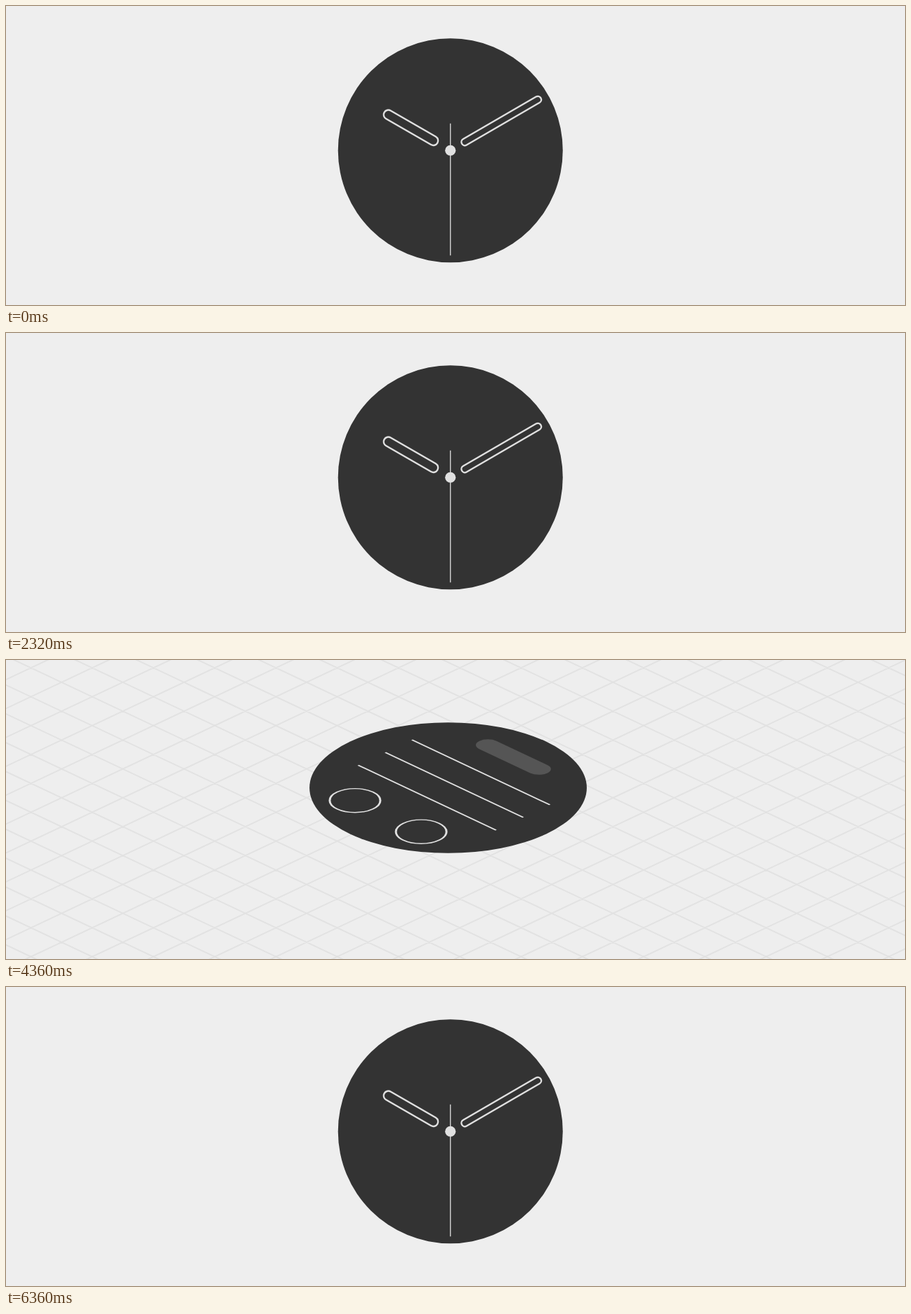
Recreate the animation shown at these times as an HTML page. Size 1280 by 427 pixels, loop 7 s.

```html
<!DOCTYPE html>
<html lang="en">
<head>
<meta charset="utf-8">
<title>Watch faces</title>
<style>
  html, body { margin: 0; width: 100%; height: 100%; overflow: hidden; background: #eee; }
  svg { display: block; width: 100vw; height: 100vh; }
  .disc { fill: #333; }
  .line { fill: none; stroke: #e0e0e0; stroke-width: 2.4; }
  .thin { stroke-width: 1.3; }
  .dot { fill: #e0e0e0; }
  .pill { fill: #555; }
  #grid { fill: none; stroke: #e2e2e2; stroke-width: 2.6; }
</style>
</head>
<body>
<svg viewBox="0 0 1280 427">
  <path id="grid"/>
  <g id="clock">
    <circle class="disc" r="160"/>
    <rect class="line" x="21.3" y="-6.7" width="87.4" height="13.4" rx="6.7" transform="rotate(-150)"/>
    <rect class="line" x="18.9" y="-4.9" width="130" height="9.8" rx="4.9" transform="rotate(-30.2)"/>
    <path class="line thin" d="M0-38.5V150"/>
    <circle class="dot" r="7.6"/>
  </g>
  <g id="list">
    <circle class="disc" r="160"/>
    <rect class="pill" x="-55.5" y="-120.5" width="111" height="28" rx="14"/>
    <path class="line" d="M-112.5-53.5h225M-112.5-10h225M-112.5 34.3h225"/>
    <circle class="line" cx="-54" cy="98" r="29.2"/>
    <circle class="line" cx="54" cy="98" r="29.2"/>
  </g>
</svg>
<script>
const LOOP = 7000;
const CENTER = [632.75, 206.25];
const ARM = [473, -50];          // face centre relative to the pivot
const SHIFT = [13.5, -246.7];    // pivot travel when fully tilted
const AXIS = [0.7782, -0.3223, 0.5387];
const TILT = 75.1 * Math.PI / 180;
const LIFT = 30;

const byId = id => document.getElementById(id);
const grid = byId('grid'), clock = byId('clock'), list = byId('list');

function bezier(x1, y1, x2, y2) {
  const at = (a, b, u) => 3 * a * u * (1 - u) ** 2 + 3 * b * u * u * (1 - u) + u ** 3;
  return x => {
    if (x <= 0) return 0;
    if (x >= 1) return 1;
    let lo = 0, hi = 1;
    for (let i = 0; i < 24; i++) {
      const mid = (lo + hi) / 2;
      if (at(x1, x2, mid) < x) lo = mid; else hi = mid;
    }
    return at(y1, y2, lo);
  };
}
const ease = bezier(0.25, 0.1, 0.25, 1);
const easeInOut = bezier(0.42, 0, 0.58, 1);
const ramp = (t, start, length, curve = ease) => curve((t - start) / length);

// Orthographic view of the plane, turned about AXIS while it grows.
function view(p) {
  const [x, y, z] = AXIS;
  const c = Math.cos(TILT * p), s = Math.sin(TILT * p), v = 1 - c;
  const k = 1 / (1 - 0.1896 * p);
  const m = [
    c + x * x * v, x * y * v - z * s, x * z * v + y * s,
    x * y * v + z * s, c + y * y * v, y * z * v - x * s
  ].map(n => n * k);
  const e = CENTER[0] + SHIFT[0] * p + (m[0] - 1) * ARM[0] + m[1] * ARM[1];
  const f = CENTER[1] + SHIFT[1] * p + m[3] * ARM[0] + (m[4] - 1) * ARM[1];
  return { m, e, f };
}

function place(node, { m, e, f }, opacity, z = 0, size = 1) {
  const parts = [m[0] * size, m[3] * size, m[1] * size, m[4] * size, e + m[2] * z, f + m[5] * z];
  node.setAttribute('transform', `matrix(${parts.map(n => n.toFixed(5))})`);
  node.setAttribute('opacity', opacity.toFixed(4));
  node.style.display = opacity > 0 ? '' : 'none';
}

function draw(now) {
  const t = now % LOOP;
  const tilt = ramp(t, 2985, 580, easeInOut) - ramp(t, 5852, 500);
  const swap = ramp(t, 1009, 300) - ramp(t, 2009, 300)
             + ramp(t, 4030, 300) - ramp(t, 5030, 300);
  const plane = view(tilt);
  place(grid, plane, tilt);
  place(clock, plane, 1 - swap, -LIFT * swap, 1 - 0.23 * swap);
  place(list, plane, swap, 1.4 + (LIFT - 1.4) * (1 - swap));
}

let lines = '';
for (let i = -1500; i <= 1500; i += 50) {
  lines += `M-1500 ${i + 31}H1500M${i} -1500V1500`;
}
grid.setAttribute('d', lines);

function tick(now) {
  draw(now);
  requestAnimationFrame(tick);
}
draw(0);
requestAnimationFrame(tick);
</script>
</body>
</html>
```
